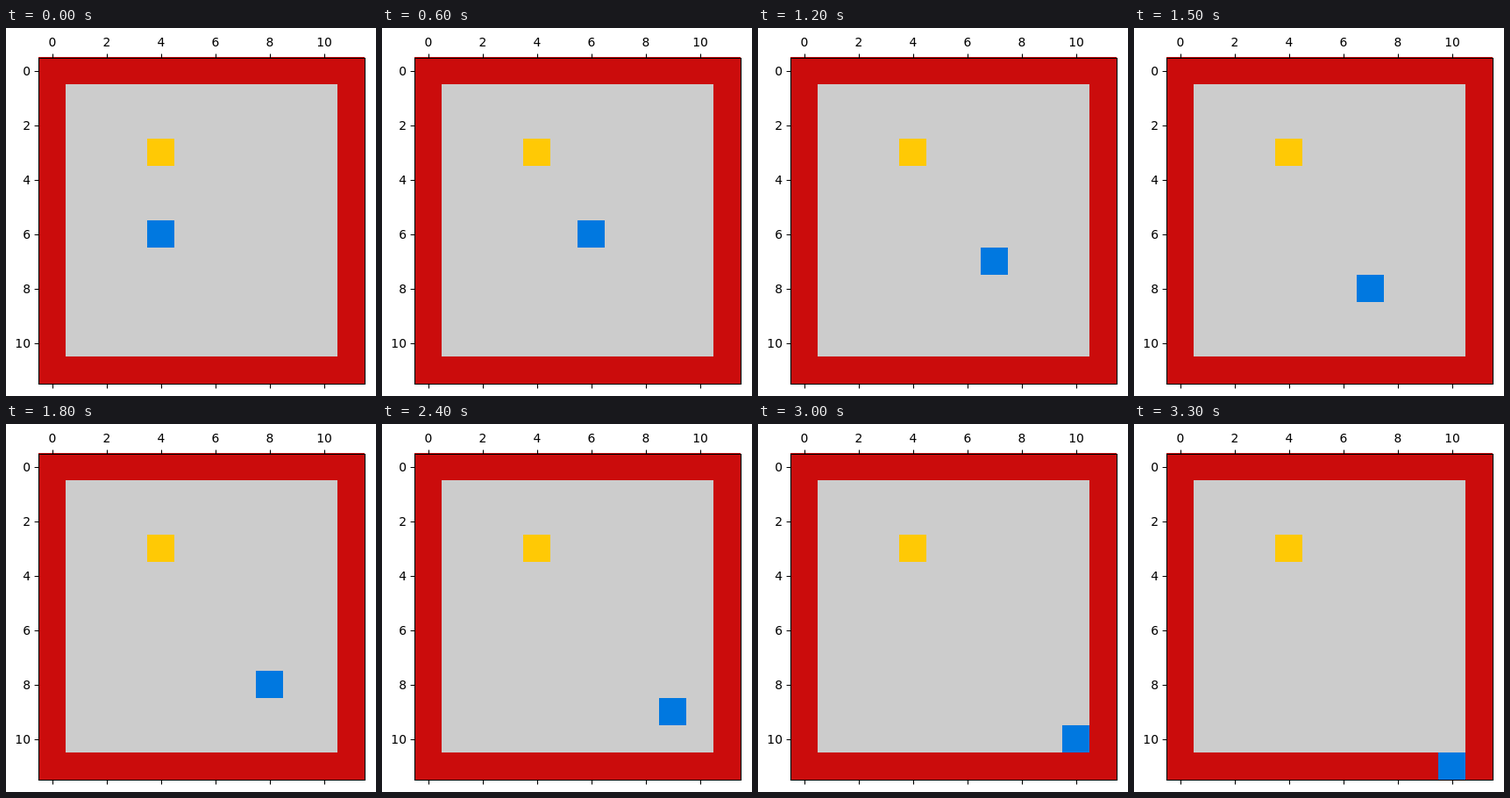
An HTML page that plays this animation: 422x419 px, repeating every 3.6 s.

```html
<!DOCTYPE html>
<html lang="en">
<head>
<meta charset="utf-8">
<title>Grid walk</title>
<style>
  html, body { margin: 0; width: 100%; height: 100%; overflow: hidden; background: #fff; }
  svg { display: block; }
  text { font: 13.89px "DejaVu Sans", sans-serif; }
</style>
</head>
<body>
<svg id="stage" width="422" height="419" viewBox="0 0 422 419"></svg>
<script>
const CELL = 31, LEFT = 37, TOP = 33, STEP_MS = 300;
const START = [4, 6];
const MOVES = "RRDRDRDRDRD";
const stage = document.getElementById("stage");

function add(tag, attrs, content = "") {
  const node = document.createElementNS("http://www.w3.org/2000/svg", tag);
  for (const name in attrs) node.setAttribute(name, attrs[name]);
  node.textContent = content;
  return stage.appendChild(node);
}

const block = (col, row, size, fill) => add("rect", {
  x: LEFT + col * CELL, y: TOP + row * CELL,
  width: size * CELL, height: size * CELL, fill
});
const line = d => add("path", { d, fill: "none", stroke: "#000", "stroke-width": 1.11 });

block(0, 0, 12, "#cb0c0c");
block(1, 1, 10, "#ccc");
block(4, 3, 1, "#ffc905");
const walker = block(...START, 1, "#0078e0");

line("M37.5 34.5H409.5V405.5H37.5Z");
for (let n = 0; n <= 10; n += 2) {
  const x = 53.5 + n * CELL, y = 49.5 + n * CELL;
  line(`M${x} 29.6V34.5M${x} 405.5V410.4M32.6 ${y}H37.5`);
  add("text", { x: x - 0.5, y: 21, "text-anchor": "middle" }, n);
  add("text", { x: 28, y: y + 4.5, "text-anchor": "end" }, n);
}

// Cell occupied after each move, beginning with the starting cell.
const cells = [START];
for (const move of MOVES) {
  const [col, row] = cells[cells.length - 1];
  cells.push(move === "R" ? [col + 1, row] : [col, row + 1]);
}

function draw() {
  const [col, row] = cells[Math.floor(performance.now() / STEP_MS) % cells.length];
  walker.setAttribute("x", LEFT + col * CELL);
  walker.setAttribute("y", TOP + row * CELL);
  requestAnimationFrame(draw);
}
draw();
</script>
</body>
</html>
```
